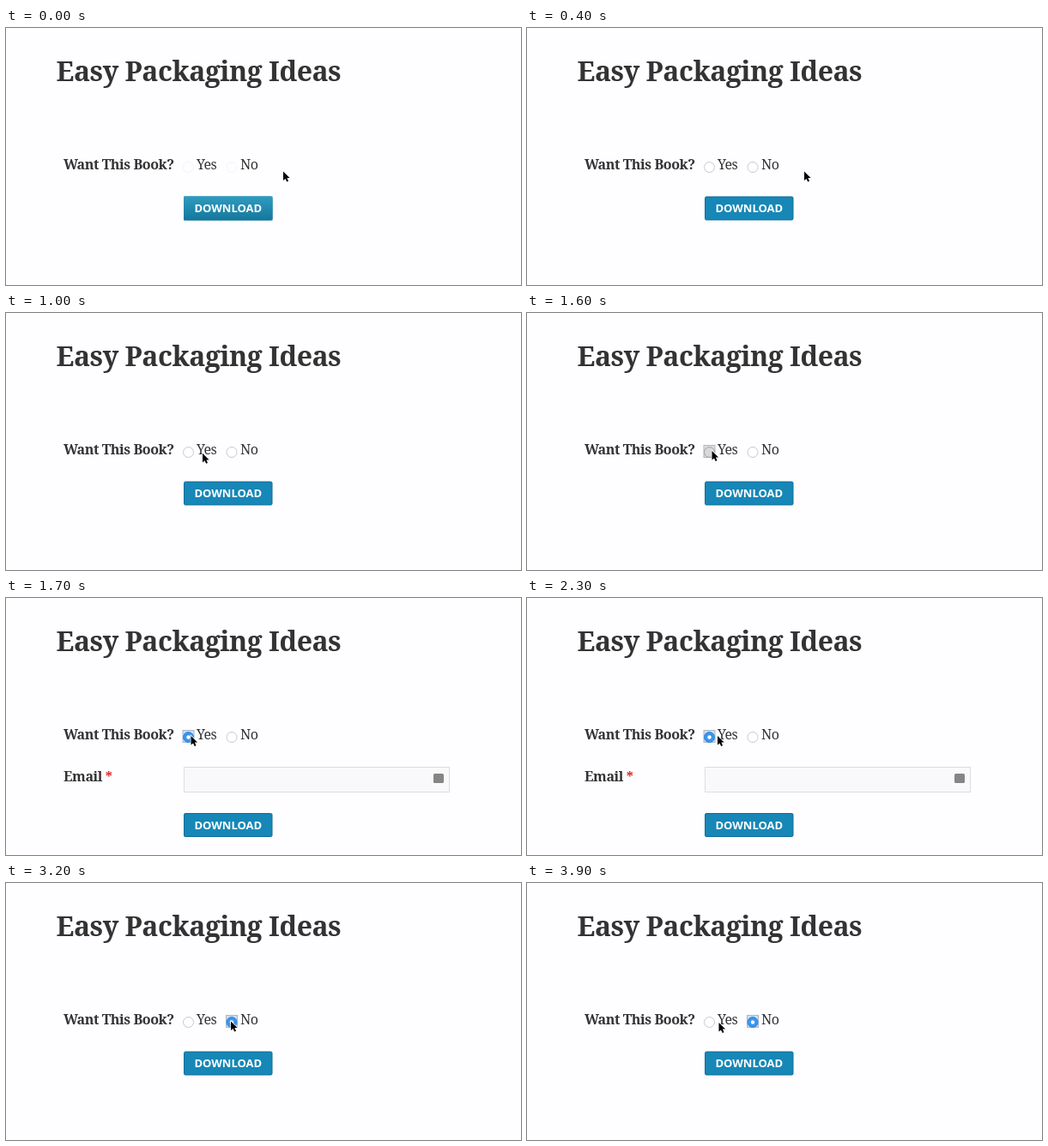
An HTML page that plays this animation: 600 px wide and 300 px high, repeating every 4000 ms.

```html
<!DOCTYPE html>
<html lang="en">
<head>
<meta charset="utf-8">
<title>Conditional form field</title>
<style>
  html, body { margin: 0; width: 100%; height: 100%; overflow: hidden; background: #fefdff; }
  svg { display: block; width: 600px; height: 300px; }
  text { font: 16px "Noto Serif", serif; letter-spacing: -.026em; fill: #333; }
  .bold { font-weight: 700; }
  .title { font-size: 32px; font-weight: 700; letter-spacing: -.016em; }
  .label { font: 700 13px "Open Sans", sans-serif; letter-spacing: 0; fill: #fff; }
  .ring { fill: #fff; stroke: #cbc6d0; }
  .focus { fill: #e0e0e2; stroke: #b4b4b6; visibility: hidden; }
  .focused .focus { visibility: visible; }
  .focused .ring { fill: #d9d9db; stroke: #a2a2a4; }
  .on .ring { fill: #3b94ee; stroke: #2f86e0; }
  .on .focus { fill: #cfe0f2; stroke: #a9b6c4; }
  .dot { fill: #fff; visibility: hidden; }
  .on .dot { visibility: visible; }
</style>
</head>
<body>
<svg viewBox="0 0 600 300">
  <defs>
    <linearGradient id="shade" x2="0" y2="1">
      <stop stop-color="#2f9cc0"/>
      <stop offset="1" stop-color="#14779c"/>
    </linearGradient>
    <g id="radio">
      <rect class="focus" x="-6.5" y="-8" width="13" height="14"/>
      <circle class="ring" r="6"/>
      <circle class="dot" r="2.2"/>
    </g>
  </defs>

  <text class="title" x="58.5" y="62">Easy Packaging Ideas</text>
  <text class="bold" x="67" y="165">Want This Book?</text>
  <g id="yes" transform="translate(212.5 162.5)"></g>
  <text x="222" y="165">Yes</text>
  <g id="no" transform="translate(263 162.5)"></g>
  <text x="273" y="165">No</text>

  <g id="email">
    <text class="bold" x="67" y="214">Email <tspan fill="#e0201b">*</tspan></text>
    <rect x="207.5" y="197.5" width="309" height="29" fill="#f9f8fb" stroke="#dddce0"/>
    <rect x="498" y="205" width="12" height="11" rx="1.5" fill="#858585"/>
  </g>

  <g id="button">
    <rect x="207.5" y="197" width="102.5" height="27" rx="1.5" fill="#1687b7" stroke="#0e6c97"/>
    <rect id="gloss" x="207" y="196.5" width="103.5" height="28" fill="url(#shade)"/>
    <text class="label" x="258.8" y="215.2" text-anchor="middle">DOWNLOAD</text>
  </g>

  <path id="cursor" d="M0 0V10.6L2.5 8.4 4.2 12 6 11.2 4.4 7.6H7.6Z"
        fill="#000" stroke="#fff" stroke-width="1.4" paint-order="stroke"/>
</svg>
<script>
const LOOP = 4000, STEP = 100;
const $ = id => document.getElementById(id);

// Pointer stops: time, x, y
const stops = [
  [0, 323, 167.5], [400, 323, 167.5], [1000, 229, 163.8], [1500, 215.5, 161],
  [2200, 215.5, 161], [2300, 222, 161], [2800, 262, 161.5],
  [3500, 262, 161.5], [3900, 223.5, 163], [LOOP, 223.5, 163]
];

const radios = ["yes", "no"].map(id => {
  const group = $(id);
  group.append(...$("radio").cloneNode(true).children);
  return group;
});

function pointerAt(t) {
  const i = stops.findIndex(s => s[0] > t);
  const [t0, x0, y0] = stops[i - 1], [t1, x1, y1] = stops[i];
  const u = (t - t0) / (t1 - t0), e = u * u * (3 - 2 * u);
  return [x0 + (x1 - x0) * e, y0 + (y1 - y0) * e];
}

function setRadio(group, on, focused, opacity) {
  group.classList.toggle("on", on);
  group.classList.toggle("focused", focused);
  group.setAttribute("opacity", opacity);
}

function draw(now) {
  const t = Math.floor(now % LOOP / STEP) * STEP;
  const open = t >= 1700 && t < 3200;
  const settled = Math.min(1, t / 200);
  const opacity = 0.2 + 0.8 * settled;

  setRadio(radios[0], open, t >= 1600 && t < 3100, opacity);
  setRadio(radios[1], t >= 3200, t >= 3100, opacity);
  $("email").setAttribute("visibility", open ? "visible" : "hidden");
  $("button").setAttribute("transform", `translate(0 ${open ? 54.5 : 0})`);
  $("gloss").setAttribute("opacity", 1 - settled);
  $("cursor").setAttribute("transform", `translate(${pointerAt(t)})`);
  requestAnimationFrame(draw);
}
draw(0);
</script>
</body>
</html>
```
